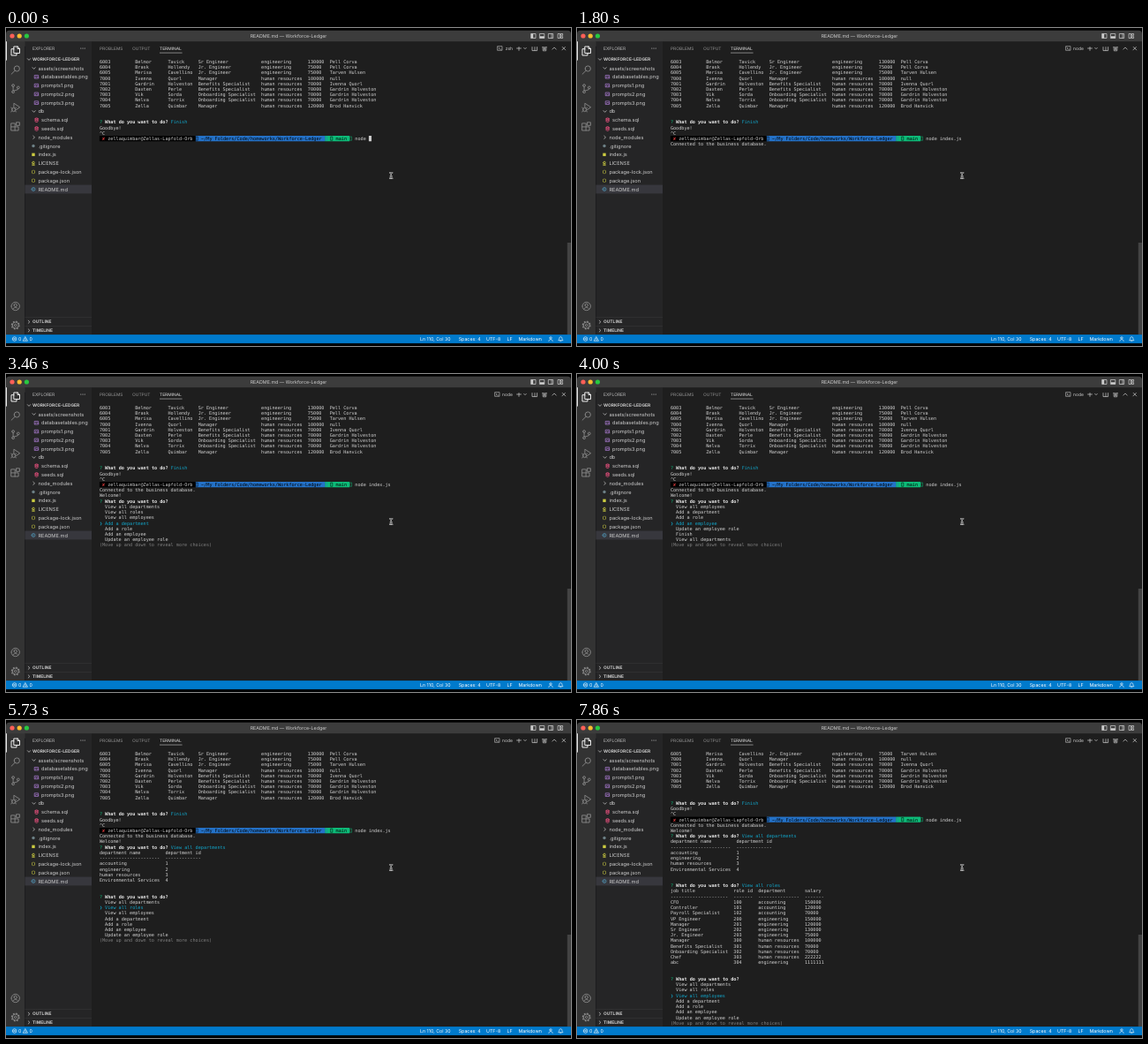
Write an HTML page that moves like this. It is 640 px wide and 360 px high and loops after 8 s.

```html
<!DOCTYPE html>
<html lang="en">
<head>
<meta charset="utf-8">
<title>Terminal session</title>
<style>
html, body { margin: 0; width: 100%; height: 100%; overflow: hidden; background: #000; }
svg { display: block; width: 640px; height: 360px; }
text { white-space: pre; text-rendering: geometricPrecision; font-family: Inter, "Open Sans", sans-serif; }
#term text { font: 5.17px "DejaVu Sans Mono", "Liberation Mono", monospace; fill: #d2d2d2; }
#term .b { font-weight: bold; fill: #eaeaea; }
#term .cyan { fill: #11a8cd; }
#term .green { fill: #0dbc79; }
#term .red { fill: #e03c3c; }
#term .dim { fill: #808080; }
#term .k { fill: #000; }
.ic { fill: none; stroke-width: .75; stroke-linecap: round; stroke-linejoin: round; }
</style>
</head>
<body>
<svg viewBox="0 0 640 360">
  <g id="chrome"></g>
  <g id="term"></g>
  <g id="shell"></g>
  <g id="pointer"></g>
</svg>
<script>
const $ = id => document.getElementById(id);
const LOOP = 8000;
const CW = 3.1126, LH = 6.224, X0 = 105.9, Y0 = 38, ROWS = 50;
const PROJECT = 'Workforce-Ledger';

// Markup helpers
const rect = (x, y, w, h, fill, extra = '') =>
  `<rect x="${x}" y="${y}" width="${w}" height="${h}" fill="${fill}" ${extra}/>`;
const dot = (x, y, r, fill) => `<circle cx="${x}" cy="${y}" r="${r}" fill="${fill}"/>`;
const icon = (x, y, d, color = '#c5c5c5', w = .75) =>
  `<path class="ic" transform="translate(${x} ${y})" d="${d}" stroke="${color}" style="stroke-width:${w}"/>`;
const label = (x, y, s, size = 5.65, fill = '#cccccc', extra = '') =>
  `<text x="${x}" y="${y + size * .36}" font-size="${size}" fill="${fill}" ${extra}>${s}</text>`;
const ring = r => `M${-r} 0a${r} ${r} 0 1 0 ${2 * r} 0a${r} ${r} 0 1 0 ${-2 * r} 0`;
const box = (w, h) => `M${-w / 2} ${-h / 2}h${w}v${h}h${-w}z`;

const DOWN = 'M-1.6 -.8L0 .9L1.6 -.8', RIGHT = 'M-.8 -1.6L.9 0L-.8 1.6';

function titleBar() {
  const c = '#cccccc';
  return rect(0, 2.8, 640, 18, '#3c3c3c', 'rx="4"') +
    dot(7, 9, 2.6, '#ff5f57') + dot(15.2, 9, 2.6, '#febc2e') + dot(23.4, 9, 2.6, '#28c840') +
    label(320, 9, `README.md — ${PROJECT}`, 5.35, c, 'text-anchor="middle"') +
    icon(597.5, 9, box(5, 5), c) + rect(595, 6.5, 2.2, 5, c) +
    icon(607.3, 9, box(5, 5), c) + rect(604.8, 9.3, 5, 2.2, c) +
    icon(617.2, 9, box(5, 5) + 'M.8 -2.5v5', c) +
    icon(628, 9, 'M-2.5 -2.5h2v5h-2zM.8 -2.5h1.8v1.8h-1.8zM.8 .7h1.8v1.8h-1.8z', c);
}

function activityBar() {
  const g = '#8a8a8a';
  return rect(0, 15.2, 21.4, 332, '#333333') + rect(0, 15.2, .9, 21.4, '#fff') +
    icon(10.7, 26, 'M-1.5 -5h4l2.3 2.3v5.2h-6.3zM2.3 -5v2.5h2.5M-1.7 -2.3h-3v7.3h6v-2.3', '#fff', .9) +
    icon(10.7, 47.2, 'M-1.5 -1.2a3.1 3.1 0 1 0 6.2 0a3.1 3.1 0 1 0 -6.2 0M-.6 1.1L-4.6 5', g, .9) +
    icon(10.7, 68.6, 'M-4 -3.5a1.4 1.4 0 1 0 2.8 0a1.4 1.4 0 1 0 -2.8 0M-4 3.7a1.4 1.4 0 1 0 2.8 0a1.4 1.4 0 1 0 -2.8 0' +
      'M1.7 -1.2a1.4 1.4 0 1 0 2.8 0a1.4 1.4 0 1 0 -2.8 0M-2.6 -2.1v4.4M3.1 .2c0 2 -3.5 1.2 -5 2.3', g, .9) +
    icon(10.7, 90, 'M-1.8 -.5v-4.3L5 -.3L.3 2.9M-4 2.4a1.9 2.2 0 1 0 3.8 0a1.9 2.2 0 1 0 -3.8 0M-5 .2l1.3 1M-5 4.8l1.3 -1M.8 .2l-1.3 1M.8 4.8l-1.3 -1', g, .9) +
    icon(10.7, 111.4, 'M-4.6 -3.5h4v4h4v4.1h-8zM-4.6 .5h4v4.1M1.2 -4.6h3.5v3.5h-3.5z', g, .9) +
    icon(10.7, 315, ring(4.7) + 'M-1.7 -1.2a1.7 1.7 0 1 0 3.4 0a1.7 1.7 0 1 0 -3.4 0M-3 3.4c.6 -2.6 5.4 -2.6 6 0', g, .9) +
    icon(10.7, 336.5, ring(3.5) + ring(1.3), g, .9) +
    `<circle cx="10.7" cy="336.5" r="4.3" fill="none" stroke="${g}" stroke-width="1.3" stroke-dasharray="1.7 1.677"/>`;
}

const fileIcons = {
  image: (x, y) => icon(x, y, box(4, 3.6) + 'M-1.7 1.2l1.3 -1.7l1 1l.6 -.7l.9 1.2', '#a074c4', .8),
  sql: (x, y) => icon(x, y, 'M-1.5 -1.6a1.5 .7 0 1 0 3 0a1.5 .7 0 1 0 -3 0v3.2c0 .9 3 .9 3 0v-3.2M-1.5 0c0 .9 3 .9 3 0', '#f55385', .8),
  git: (x, y) => dot(x, y, 1.7, '#6d8086'),
  script: (x, y) => rect(x - 1.7, y - 1.7, 3.4, 3.4, '#cbcb41'),
  license: (x, y) => icon(x, y - .7, ring(1.3) + 'M-.8 1.2l-.4 2l1.2 -.6l1.2 .6l-.4 -2', '#cbcb41', .8),
  json: (x, y) => icon(x, y, 'M-.8 -1.8c-1.3 0 -.1 1.5 -1.2 1.8c1.1 .3 -.1 1.8 1.2 1.8M.8 -1.8c1.3 0 .1 1.5 1.2 1.8c-1.1 .3 .1 1.8 -1.2 1.8', '#cbcb41', .7),
  info: (x, y) => icon(x, y, ring(2) + 'M0 -.1v1M0 -1v.05', '#519aba', .7),
  open: (x, y) => icon(x + .6, y, DOWN),
  closed: (x, y) => icon(x + .6, y, RIGHT)
};

// kind, name, depth
const files = [
  ['open', 'assets/screenshots', 0], ['image', 'databasetables.png', 1], ['image', 'prompts1.png', 1],
  ['image', 'prompts2.png', 1], ['image', 'prompts3.png', 1], ['open', 'db', 0], ['sql', 'schema.sql', 1],
  ['sql', 'seeds.sql', 1], ['closed', 'node_modules', 0], ['git', '.gitignore', 0], ['script', 'index.js', 0],
  ['license', 'LICENSE', 0], ['json', 'package-lock.json', 0], ['json', 'package.json', 0], ['info', 'README.md', 0]
];

function sideBar() {
  const bold = 'font-weight="700"';
  const tree = files.map(([kind, name, depth], i) => {
    const y = 45.5 + i * 9.785;
    return fileIcons[kind](31 + depth * 3.6, y) + label(36.4 + depth * 3.6, y, name);
  }).join('');
  return rect(21.4, 15.2, 75.6, 332, '#252526') + rect(21.4, 177.6, 75.6, 9.8, '#37373d') +
    label(30, 23, 'EXPLORER', 4.95, '#bbbbbb') +
    [84.8, 87, 89.2].map(x => dot(x, 23, .55, '#c5c5c5')).join('') +
    icon(26, 35.5, DOWN) + label(30, 35.5, PROJECT.toUpperCase(), 4.9, '#cccccc', bold) + tree +
    rect(21.4, 327.5, 75.6, .45, '#3c3c3d') + rect(21.4, 337.3, 75.6, .45, '#3c3c3d') +
    icon(26, 332.7, RIGHT) + label(30, 332.7, 'OUTLINE', 4.9, '#cccccc', bold) +
    icon(26, 342.4, RIGHT) + label(30, 342.4, 'TIMELINE', 4.9, '#cccccc', bold);
}

function panel() {
  return rect(97, 15.2, 543, 332, '#1e1e1e') +
    label(106, 23, 'PROBLEMS', 4.9, '#969696') + label(143, 23, 'OUTPUT', 4.9, '#969696') +
    label(174, 23, 'TERMINAL', 4.9, '#e7e7e7') + rect(174, 27.8, 25.6, .5, '#e7e7e7') +
    icon(581, 23, 'M-2.4 0h4.8M0 -2.4v4.8') + icon(588, 23, 'M-1.3 -.6L0 .7L1.3 -.6') +
    icon(599, 23, box(5.2, 5.2) + 'M0 -2.6v5.2') +
    icon(610, 23, 'M-2.6 -1.9h5.2M-1 -1.9v-.9h2v.9M-2 -1.9l.3 4.7h3.4l.3 -4.7M-.6 -.5v2M.6 -.5v2') +
    icon(621, 23, 'M-2.2 1.1L0 -1.1L2.2 1.1') + icon(631.8, 23, 'M-1.9 -1.9l3.8 3.8M1.9 -1.9l-3.8 3.8') +
    rect(635.8, 243, 4.2, 104, '#434343');
}

function statusBar() {
  const w = '#ffffff', y = 352;
  const items = [[469, 'Ln 110, Col 30'], [512.7, 'Spaces: 4'], [544, 'UTF-8'], [567.5, 'LF'], [580.5, 'Markdown'], [14, '0'], [26.6, '0']];
  return rect(0, 347.1, 640, 9.8, '#007acc') +
    items.map(([x, s]) => label(x, y, s, 5.3, w)).join('') +
    icon(9.6, y, ring(2.3) + 'M-.9 -.9l1.8 1.8M.9 -.9l-1.8 1.8', w, .6) +
    icon(22, y, 'M0 -2.2L2.5 2.2h-5zM0 -.6v1.2M0 1.4v.05', w, .6) +
    icon(617, y, 'M-1.2 -1.1a1.2 1.2 0 1 0 2.4 0a1.2 1.2 0 1 0 -2.4 0M-2.2 2.4c.2 -2.6 4.2 -2.6 4.4 0', w, .6) +
    icon(628.3, y, 'M-2.3 1.4c1 -1 .3 -3.8 2.3 -3.8s1.3 2.8 2.3 3.8zM-.6 2.2h1.2', w, .6);
}

// Terminal content: a row is a list of [text, class]
const plain = s => [[s, '']];
const table = (widths, rows) => rows.map(r => plain(r.map((c, i) => String(c).padEnd(widths[i])).join('')));
const rule = (...n) => n.map(k => '-'.repeat(k));

const HR = 'human resources', ENG = 'engineering', ACC = 'accounting';
const BEN = 'Benefits Specialist', ONB = 'Onboarding Specialist', LEAD = 'Gardrin Holveston';

const staff = table([13, 12, 11, 23, 17, 8, 0], [
  [6003, 'Belmor', 'Tavick', 'Sr Engineer', ENG, 130000, 'Pell Corva'],
  [6004, 'Brask', 'Hollendy', 'Jr. Engineer', ENG, 75000, 'Pell Corva'],
  [6005, 'Merisa', 'Cavellino', 'Jr. Engineer', ENG, 75000, 'Tarven Hulsen'],
  [7000, 'Ivenna', 'Quorl', 'Manager', HR, 100000, 'null'],
  [7001, 'Gardrin', 'Holveston', BEN, HR, 70000, 'Ivenna Quorl'],
  [7002, 'Daxten', 'Perle', BEN, HR, 70000, LEAD],
  [7003, 'Vik', 'Sorda', ONB, HR, 70000, LEAD],
  [7004, 'Nelva', 'Torrix', ONB, HR, 70000, LEAD],
  [7005, 'Zella', 'Quimbar', 'Manager', HR, 120000, 'Brod Hanvick']
]);
const departments = table([24, 0], [
  ['department name', 'department id'], rule(22, 13),
  [ACC, 1], [ENG, 2], [HR, 3], ['Environmental Services', 4]
]);
const roles = table([23, 9, 17, 0], [
  ['job title', 'role id', 'department', 'salary'], rule(21, 7, 15, 7),
  ['CFO', 100, ACC, 150000], ['Controller', 101, ACC, 120000], ['Payroll Specialist', 102, ACC, 70000],
  ['VP Engineer', 200, ENG, 150000], ['Manager', 201, ENG, 120000], ['Sr Engineer', 202, ENG, 130000],
  ['Jr. Engineer', 203, ENG, 75000], ['Manager', 300, HR, 100000], [BEN, 301, HR, 70000],
  [ONB, 302, HR, 70000], ['Chef', 303, HR, 222222], ['abc', 304, ENG, 1111111]
]);
const choices = ['View all departments', 'View all roles', 'View all employees', 'Add a department',
  'Add a role', 'Add an employee', 'Update an employee role', 'Finish'];

const blank = [plain(''), plain('')];
const ask = (s = '', cls = 'cyan') => [['? ', 'green'], ['What do you want to do? ', 'b'], [s, cls]];

// Seven visible choices; the list wraps once the pointer reaches the middle.
function menu(n) {
  const at = Math.min(n, 3), rows = [ask(n ? '' : '(Use arrow keys)', 'dim')];
  for (let j = 0; j < 7; j++) {
    const name = choices[(n - at + j + 8) % 8];
    rows.push(j === at ? [['❯ ' + name, 'cyan']] : plain('  ' + name));
  }
  return [...rows, [['(Move up and down to reveal more choices)', 'dim']]];
}

const keys = [260, 400, 530, 660, 860, 1060, 1200, 1330];
const downs = [
  [2660, 2930, 3200, 3660, 3860, 4060, 4260, 4600],
  [5730],
  [7200, 7530]
];
const RUN = 1600, CONNECT = 1800, READY = 2000, PICK = 4930, LIST = 5000, ROLES = 6330;
const count = (times, t) => times.filter(s => t >= s).length;

function screen(t) {
  const typed = 'node ' + 'index.js'.slice(0, count(keys, t));
  const rows = [...staff, ...blank, ask('Finish'), plain('Goodbye!'), plain('^C'), { typed, cursor: t < RUN }];
  if (t >= CONNECT) rows.push(plain('Connected to the business database.'));
  if (t >= READY) rows.push(plain('Welcome!'));
  if (t >= READY && t < PICK) rows.push(...menu(count(downs[0], t)));
  if (t >= PICK) rows.push(ask(choices[0]));
  if (t >= LIST) rows.push(...departments, ...blank);
  if (t >= LIST && t < ROLES) rows.push(...menu(count(downs[1], t)));
  if (t >= ROLES) rows.push(ask(choices[1]), ...roles, ...blank, ...menu(count(downs[2], t)));
  return rows.slice(-ROWS);
}

const col = n => X0 + n * CW;
const line = (c, y, spans) => `<text x="${col(c)}" y="${y + 1.85}">` +
  spans.map(([s, cls]) => `<tspan class="${cls}">${s}</tspan>`).join('') + '</text>';
const band = (a, b, y, fill) => rect(col(a), y - LH / 2, (b - a) * CW, LH, fill);
const tofu = (c, y, color) => icon(col(c + .5), y, box(1.8, 4.2), color, .5);

function promptLine(y, { typed, cursor }) {
  return band(0, 35, y, '#000') + band(35, 82, y, '#2472c8') + band(82, 91, y, '#0dbc79') +
    tofu(35, y, '#000') + tofu(82, y, '#2472c8') + tofu(84, y, '#000') + tofu(91, y, '#0dbc79') +
    line(1, y, [['✘ ', 'red'], ['zellaquimbar@Zellas-Lapfold-Orb', '']]) +
    line(37, y, [[`~/My Folders/Code/homeworks/${PROJECT}`, 'k']]) +
    line(86, y, [['main', 'k']]) + line(93, y, plain(typed)) +
    (cursor ? band(93 + typed.length, 94 + typed.length, y, '#cccccc') : '');
}

function shellTag(name) {
  const x = name === 'zsh' ? 559.5 : 556.5;
  return icon(x, 23, box(5, 4.6) + 'M-1.4 -1l1 1l-1 1M.3 1.1h1.1', '#c5c5c5', .6) +
    label(574, 23, name, 5, '#cccccc', 'text-anchor="end"');
}

$('chrome').innerHTML = panel() + titleBar() + rect(97, 15.2, 543, 6, '#1e1e1e') +
  activityBar() + sideBar() + statusBar();
$('pointer').innerHTML = ['#fff', '#111'].map((c, i) =>
  icon(436.2, 167, 'M-1.6 -3.2q1.6 0 1.6 1q0 -1 1.6 -1M0 -2.2v4.4M-1.6 3.2q1.6 0 1.6 -1q0 1 1.6 1M-.9 .9h1.8', c, i ? .5 : 1.3)).join('');

let shown = '';
function draw(now) {
  const t = now % LOOP;
  const html = screen(t).map((row, i) => {
    const y = Y0 + i * LH;
    return row.typed ? promptLine(y, row) : line(0, y, row);
  }).join('');
  if (html !== shown) {
    $('term').innerHTML = shown = html;
    $('shell').innerHTML = shellTag(t < RUN ? 'zsh' : 'node');
  }
  requestAnimationFrame(draw);
}
draw(performance.now());
</script>
</body>
</html>
```
